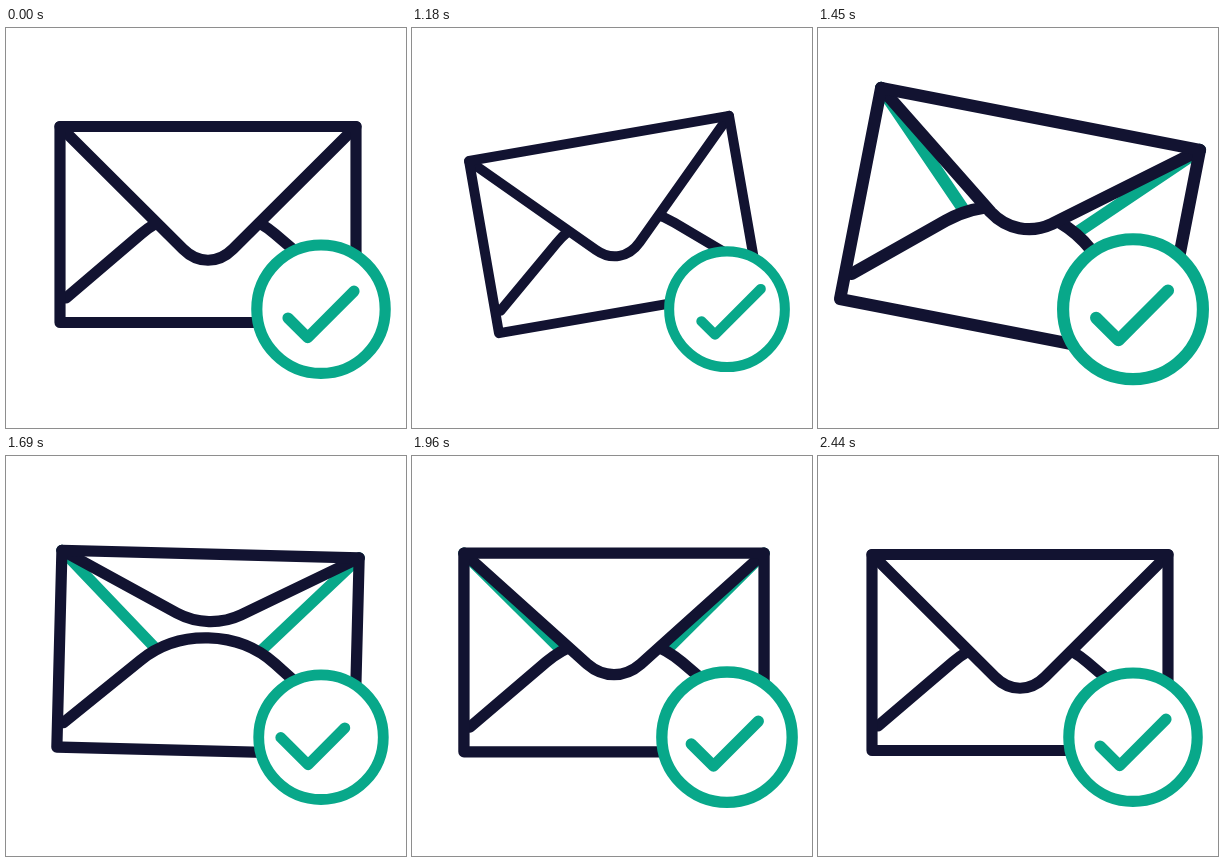
An HTML page for the animation above (2.47 s loop, 400x400 px).

```html
<!DOCTYPE html>
<html lang="en">
<head>
<meta charset="utf-8">
<title>Email confirmed</title>
<style>
  html, body { margin: 0; width: 100%; height: 100%; overflow: hidden; background: #fff; }
  svg { display: block; width: 100vw; height: 100vh; }
  path, rect, circle { stroke-width: 11.16; stroke-linecap: round; stroke-linejoin: round; }
  .ink { stroke: #121331; }
  .green { stroke: #08a88a; }
  .paper { fill: #fff; }
  .line { fill: none; }
</style>
</head>
<body>
<svg viewBox="0 0 400 400">
  <g id="mail">
    <path id="inner" class="green line"/>
    <path class="ink paper" d="M60 270L135 206C172.5 174 231.5 174 269 206L344 270"/>
    <path id="flap" class="ink paper"/>
    <rect class="ink line" x="54" y="98.5" width="296" height="196"/>
  </g>
  <g id="badge">
    <circle class="green paper" cx="315" cy="281.2" r="64.2"/>
    <path id="tick" class="green line"/>
  </g>
</svg>
<script>
const LOOP = 2470, START = 1030;
const [mail, inner, flap, badge, tick] =
  ['mail', 'inner', 'flap', 'badge', 'tick'].map(id => document.getElementById(id));

const clamp = u => Math.min(1, Math.max(0, u));
const ease = u => (1 - Math.cos(Math.PI * clamp(u))) / 2;

// Starts at a rest value, then eases by each [from, to, value] move in turn.
const track = (rest, ...moves) => time =>
  moves.reduce((v, [from, to, value]) => v + (value - v) * ease((time - from) / (to - from)), rest);

// Wind up, swing past, settle.
const mailTurn = track(0, [948, 1100, -10], [1165, 1474, 11.3], [1529, 1741, 0]);
const mailScale = track(1, [948, 1100, .89], [1165, 1474, 1.1], [1529, 1741, .99],
  [1741, 1930, 1.015], [1930, 2110, 1]);
const badgeScale = track(1, [997, 1150, .9], [1165, 1502, 1.1], [1535, 1740, .95],
  [1740, 1940, 1.016], [1940, 2110, 1]);
const flapLift = track(0, [1310, 1600, 1.01], [1660, 2090, 0]);
const tickSlide = track(0, [1030, 1250, 5.8], [1250, 1670, -8.5], [1670, 2110, 0]);

function flapPath(lift) {
  const x = 177 - 7 * lift, y = 221 - 63 * lift;
  const cx = x + 15 + 5 * lift, cy = y + 15 - 5 * lift;
  return `M54 98.5L${x} ${y}C${cx} ${cy} ${404 - cx} ${cy} ${404 - x} ${y}L350 98.5`;
}

const pose = (x, y, scale, turn = 0) =>
  `translate(${x} ${y}) rotate(${turn}) scale(${scale}) translate(${-x} ${-y})`;

function draw(loopTime) {
  const time = loopTime < START ? 0 : loopTime;
  const lift = flapLift(time), d = tickSlide(time);
  mail.setAttribute('transform', pose(202, 196.5, mailScale(time), mailTurn(time)));
  badge.setAttribute('transform', pose(315, 281.2, badgeScale(time)));
  flap.setAttribute('d', flapPath(lift));
  inner.setAttribute('visibility', lift > .005 ? 'visible' : 'hidden');
  tick.setAttribute('d', `M${282 + d} ${290 + d}L301.7 309.6L${348 + d} ${263.2 - d}`);
}

inner.setAttribute('d', flapPath(0));
const origin = performance.now();
function frame() {
  draw((performance.now() - origin) % LOOP);
  requestAnimationFrame(frame);
}
frame();
</script>
</body>
</html>
```
